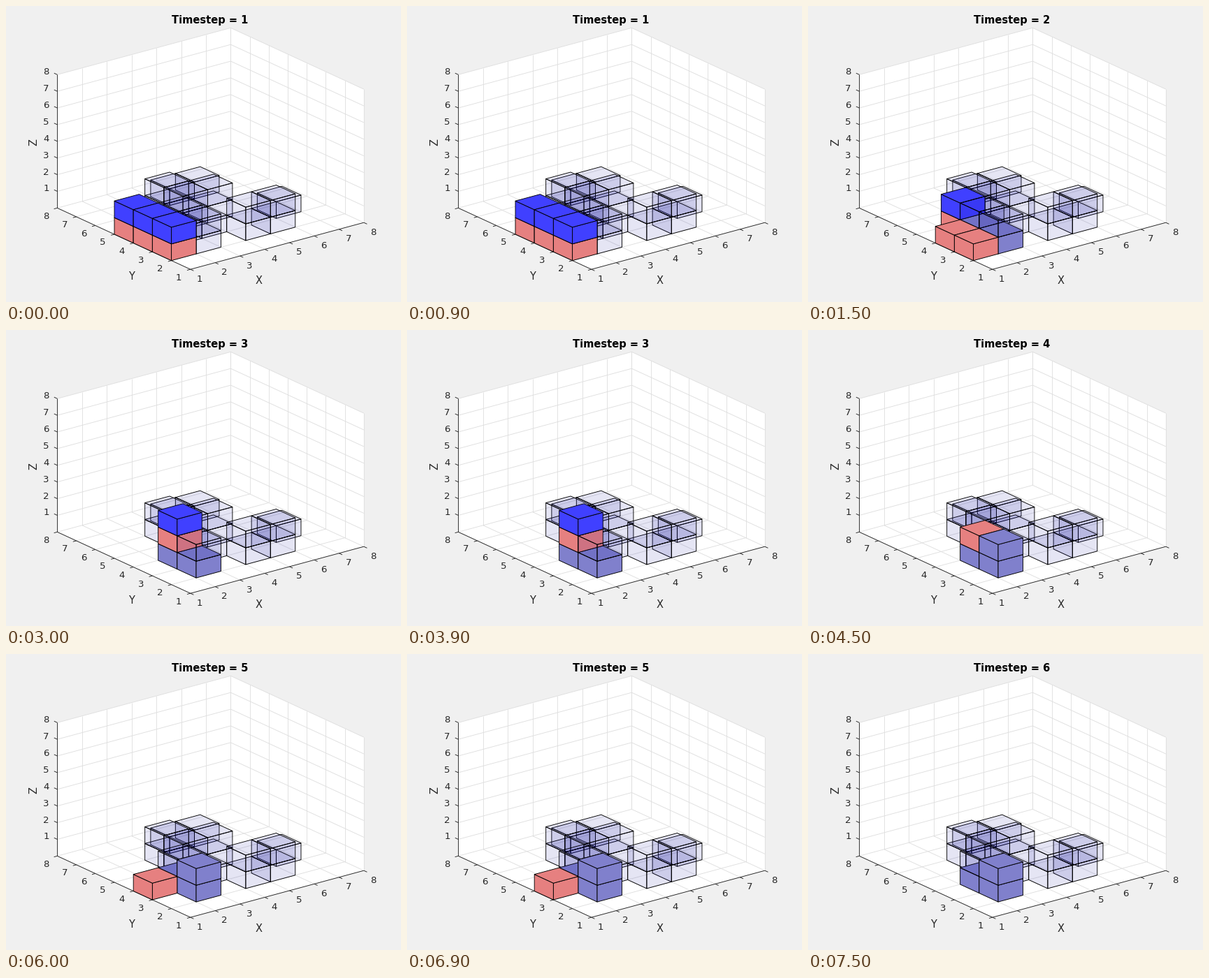
Recreate the animation shown at these times as a matplotlib script. Size 565 px wide and 424 px high, loop 8 s.

```python
import numpy as np
import matplotlib.pyplot as plt
from matplotlib.animation import FuncAnimation
from matplotlib.patches import Polygon

W, H, DPI = 565, 424, 100
PX = 72 / DPI                      # one pixel in points
ORIGIN = np.array([263.8, 377.2])  # where x = 1, y = 1, z = 0
AXES = np.array([[35.43, -9.57], [-27.2, -12.55], [0, -23.88]])
INK = (0.15, 0.15, 0.15)
GRID = (0.875, 0.875, 0.875)
STEP, LOOP, INTERVAL = 1500, 8000, 500

COLORS = {
    "ghost": (0, 0, 0.6, 0.1),
    "done": (0.502, 0.502, 0.8),
    "red": (0.902, 0.502, 0.502),
    "blue": (0.25, 0.25, 1),
}

GOAL = [(2, 2, 0), (2, 3, 0), (2, 2, 1), (2, 3, 1),
        (3, 3, 0), (3, 4, 0), (3, 4, 1), (3, 5, 0), (3, 5, 1),
        (4, 4, 0), (4, 4, 1), (4, 6, 0), (5, 6, 0),
        (4, 2, 0), (4, 2, 1), (5, 2, 0), (5, 2, 1), (6, 3, 0)]

PAIR = [(2, 2, 0), (2, 3, 0)]
TRIO = PAIR + [(2, 2, 1)]
STATES = [
    {"red": [(1, y, 0) for y in (2, 3, 4)],
     "blue": [(1, y, 1) for y in (2, 3, 4)]},
    {"red": [(1, 2, 0), (1, 3, 0), (2, 4, 0)], "blue": [(2, 4, 1)], "done": PAIR},
    {"red": [(2, 3, 1)], "blue": [(2, 3, 2)], "done": PAIR},
    {"red": [(2, 3, 1)], "done": TRIO},
    {"red": [(1, 3, 0)], "done": TRIO},
    {"done": TRIO},
]

# the three faces turned to the viewer, as corner offsets
FACES = [
    [(0, 0, 0), (0, 1, 0), (0, 1, 1), (0, 0, 1)],
    [(0, 0, 0), (1, 0, 0), (1, 0, 1), (0, 0, 1)],
    [(0, 0, 1), (1, 0, 1), (1, 1, 1), (0, 1, 1)],
]


def project(x, y, z):
    return ORIGIN + np.array([x - 1, y - 1, z]) @ AXES


fig = plt.figure(figsize=(W / DPI, H / DPI), dpi=DPI, facecolor="#f0f0f0")
ax = fig.add_axes([0, 0, 1, 1])
ax.set_xlim(0, W)
ax.set_ylim(H, 0)
ax.axis("off")


def line(a, b, color, z):
    ax.plot(*zip(a, b), color=color, lw=0.9 * PX, zorder=z,
            solid_capstyle="butt")


def label(x, y, text, size=13.33, **kw):
    kw = {"color": INK, "ha": "center", "va": "center", **kw}
    return ax.text(x, y, text, fontsize=size * PX, family="DejaVu Sans", **kw)


def draw_axes():
    outline = [(1, 1, 0), (8, 1, 0), (8, 1, 8), (8, 8, 8), (1, 8, 8), (1, 8, 0)]
    ax.add_patch(Polygon([project(*p) for p in outline], fc="white", ec="none"))
    for k in range(1, 9):
        for a, b in [((k, 1, 0), (k, 8, 0)), ((k, 8, 0), (k, 8, 8)),
                     ((1, k, 0), (8, k, 0)), ((8, k, 0), (8, k, 8)),
                     ((1, 8, k), (8, 8, k)), ((8, 8, k), (8, 1, k))]:
            line(project(*a), project(*b), GRID, 2)
    ends = [(8, 1, 0), (1, 1, 0), (1, 8, 0), (1, 8, 8)]
    for a, b in zip(ends, ends[1:]):
        line(project(*a), project(*b), INK, 3)
    for k in range(1, 9):
        for p, tick, shift in [((k, 1, 0), (4.6, 2.1), (13.5, 14)),
                               ((1, k, 0), (-4.8, 1.3), (-16.5, 12)),
                               ((1, 8, k), (-4.6, -2.1), (-16, -3.5))]:
            p = project(*p)
            line(p, p + tick, INK, 3)
            label(*(p + shift), str(k))
    label(362, 393, "X", 14.67)
    label(179, 388, "Y", 14.67)
    label(39.5, 195, "Z", 14.67, rotation=90)


draw_axes()
title = label(291.5, 24.8, "", 14.67, color="black", weight="bold", va="baseline")
cubes = []


def draw_cube(cell, kind, order):
    for face in FACES:
        pts = [project(*np.add(cell, c)) for c in face]
        patch = Polygon(pts, fc=COLORS[kind], ec="black", lw=0.9 * PX,
                        joinstyle="round", zorder=order)
        cubes.append(ax.add_patch(patch))


def draw(i):
    step = i * INTERVAL // STEP
    while cubes:
        cubes.pop().remove()
    kinds = dict.fromkeys(GOAL, "ghost")
    for kind, cells in STATES[step].items():
        kinds.update(dict.fromkeys(cells, kind))
    far_first = sorted(kinds, key=lambda c: c[2] - c[0] - c[1])
    for n, cell in enumerate(far_first):
        draw_cube(cell, kinds[cell], 10 + n)
    title.set_text(f"Timestep = {step + 1}")
    return cubes + [title]


anim = FuncAnimation(fig, draw, frames=LOOP // INTERVAL, interval=INTERVAL,
                     init_func=lambda: [], repeat=True, repeat_delay=0)
plt.show()
```
